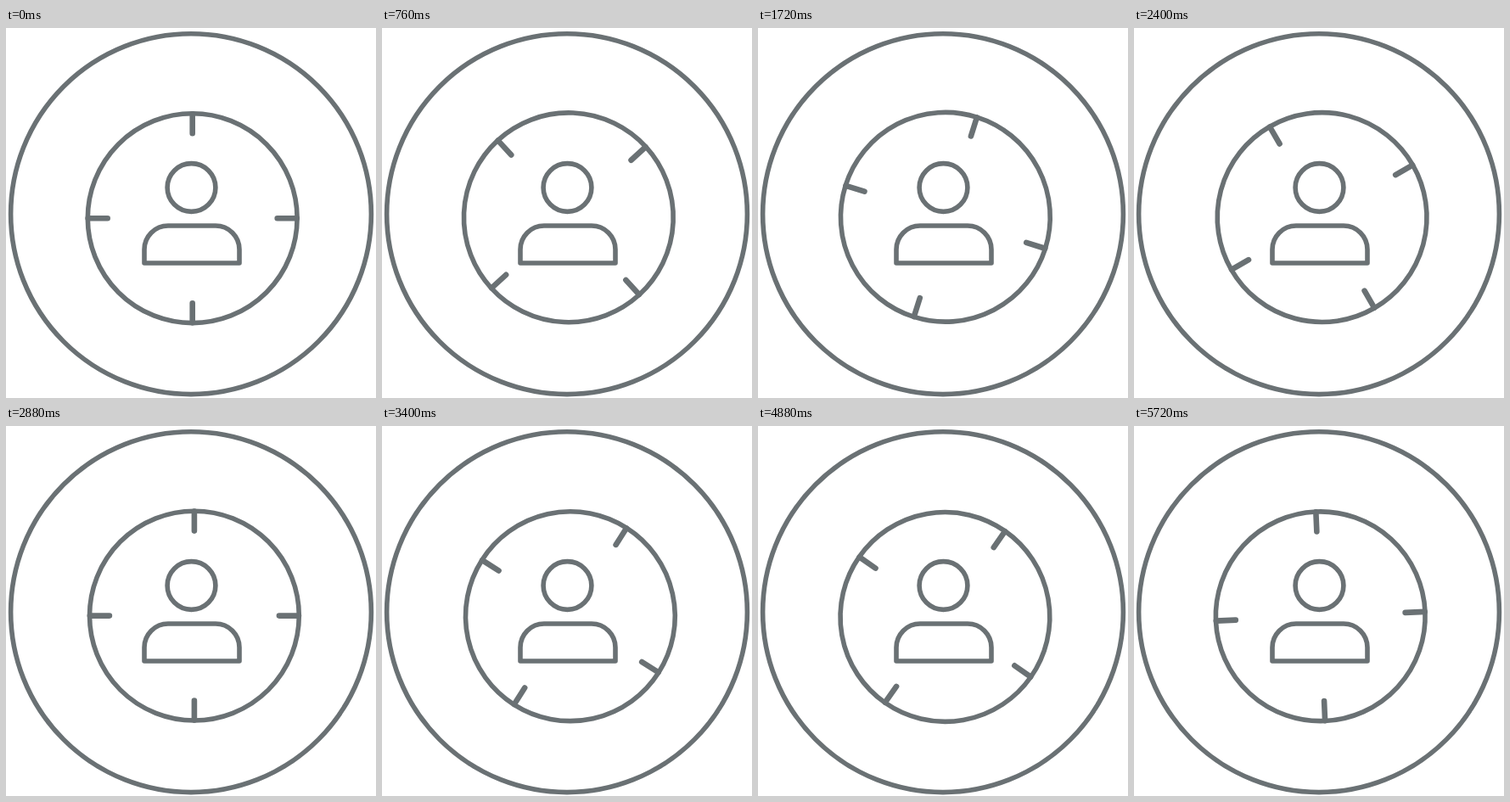
These frames come from a looping animation (436x436 px, 5.76 s). An HTML page:

```html
<!DOCTYPE html>
<html lang="en">
<head>
<meta charset="utf-8">
<title>Target person</title>
<style>
  html, body { margin: 0; width: 100%; height: 100%; overflow: hidden; background: #fff; }
  svg { display: block; width: 100%; height: 100%; }
</style>
</head>
<body>
<svg viewBox="0 0 436 436" fill="none" stroke="#6a7174" stroke-width="5.6" stroke-linecap="round" stroke-linejoin="round">
  <circle cx="218" cy="219.2" r="212.4"/>
  <circle cx="218.5" cy="188" r="28.4"/>
  <path d="M163 277V261A28 28 0 0 1 191 233H247A28 28 0 0 1 275 261V277Z"/>
  <g id="dial">
    <circle cx="219.7" cy="224.2" r="123.4"/>
    <path stroke-width="6.6" d="M219.7 101.2v23M219.7 347.2v-23M96.7 224.2h23M342.7 224.2h-23"/>
  </g>
</svg>
<script>
  const LOOP = 5760, STEP = 40;
  const dial = document.getElementById('dial');

  // The pivot sits slightly off the dial's centre, so the ring wobbles as it turns.
  function draw() {
    const t = Math.floor(performance.now() % LOOP / STEP) * STEP;
    dial.setAttribute('transform', `rotate(${t / LOOP * 360} 220.8 223.9)`);
    requestAnimationFrame(draw);
  }
  draw();
</script>
</body>
</html>
```
